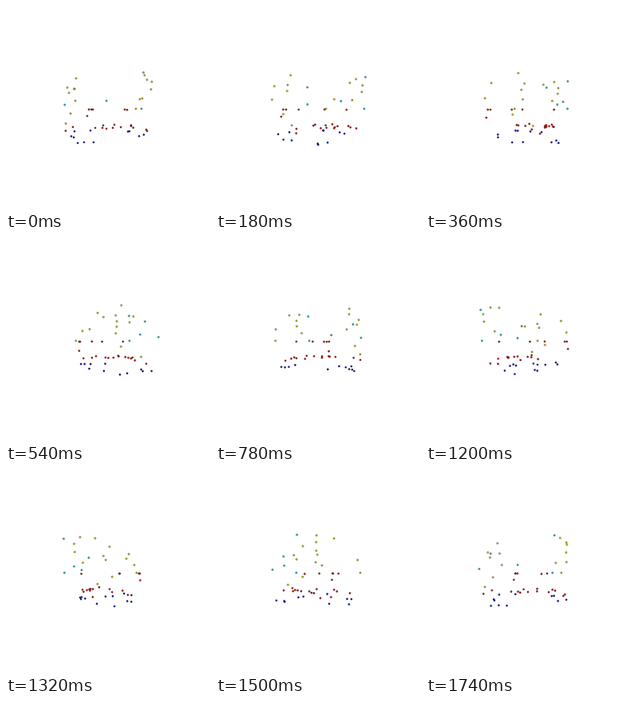
These frames come from a looping animation (256 by 256 pixels, 1.8 s). An HTML page with a canvas:

```html
<!DOCTYPE html>
<html lang="en">
<head>
<meta charset="utf-8">
<title>Turning points</title>
<style>
  html, body { margin: 0; width: 100%; height: 100%; overflow: hidden; background: #fff; }
  canvas { display: block; width: 256px; height: 256px; }
</style>
</head>
<body>
<canvas id="stage" width="256" height="256"></canvas>
<script>
const STEP = 60, STEPS = 30;
const CX = 128, CY = 129, DISTANCE = 250;

// Each point: x, depth towards the viewer, height below the horizon.
const clouds = [
  { color: '#00e4ec', points: [
    [-1.6, 44, -8.2], [36.5, 45, -37.3], [-36.6, 32, -21.8],
    [-44.6, 44.5, -4.1], [34.5, 44.8, 0]
  ] },
  { color: '#e8e400', points: [
    [-39.7, 2, -37.9], [41.2, 25.5, -37.8], [47.4, 8.3, -35.3], [48.4, 30, -29.8],
    [47.6, 29.5, -21.5], [-48.6, 12, -25.3], [-47.3, 8.3, -19.3], [-46.6, -34, -11.4],
    [47, -23.6, -14.2], [36.2, 23.7, -10.9], [39.8, -34, 0], [-47.2, -1.3, 6],
    [-48.5, 21, 17], [-47, -26, -27.6]
  ] },
  { color: '#e80808', points: [
    [-30.4, -41.6, 10.5], [-27.9, -41, 1], [-24.3, -39.5, 1], [-20, -13.6, 1],
    [22.3, -15.4, 1], [21.2, 29, 1.2], [-41, 17.4, 21.3], [-47.2, 27.8, 24.6],
    [-14.4, 25, 21.6], [-6.3, 25, 21.5], [-1.7, 33, 21.7], [5.4, 25.8, 21.5],
    [14.8, 20, 21.2], [28.6, 24.6, 21.4], [-6, -1.5, 21], [8.6, -18.5, 21.5],
    [29.9, -7.7, 21.3], [31.9, -25, 24], [45.9, 11, 25], [44.5, 23, 25.4]
  ] },
  { color: '#1010e0', points: [
    [-45.2, -19, 30.5], [-46.5, -2.2, 34.8], [-41.6, 8, 34.8], [-31.4, 43.5, 35.5],
    [-25.8, 35, 36.1], [-15.3, 38.3, 35.6], [-24.6, -29.5, 30.5], [27.5, -24.3, 31.3],
    [30.1, -28.7, 31.5], [37.8, 8, 33.2], [47, -11.5, 34]
  ] }
];

const ctx = document.getElementById('stage').getContext('2d');
ctx.strokeStyle = 'rgba(0, 0, 0, 0.8)';
ctx.lineWidth = 0.5;

function dot(x, y) {
  ctx.beginPath();
  ctx.arc(x, y, 1.1, 0, 2 * Math.PI);
  ctx.fill();
  ctx.stroke();
}

function draw(now) {
  const angle = Math.floor(now / STEP) % STEPS / STEPS * 2 * Math.PI;
  const cos = Math.cos(angle), sin = Math.sin(angle);
  ctx.clearRect(0, 0, 256, 256);
  for (const { color, points } of clouds) {
    ctx.fillStyle = color;
    for (const [x, z, h] of points) {
      const scale = DISTANCE / (DISTANCE - (z * cos - x * sin));
      dot(CX + (x * cos + z * sin) * scale, CY + h * scale);
    }
  }
}

function tick() {
  draw(performance.now());
  requestAnimationFrame(tick);
}
tick();
</script>
</body>
</html>
```
